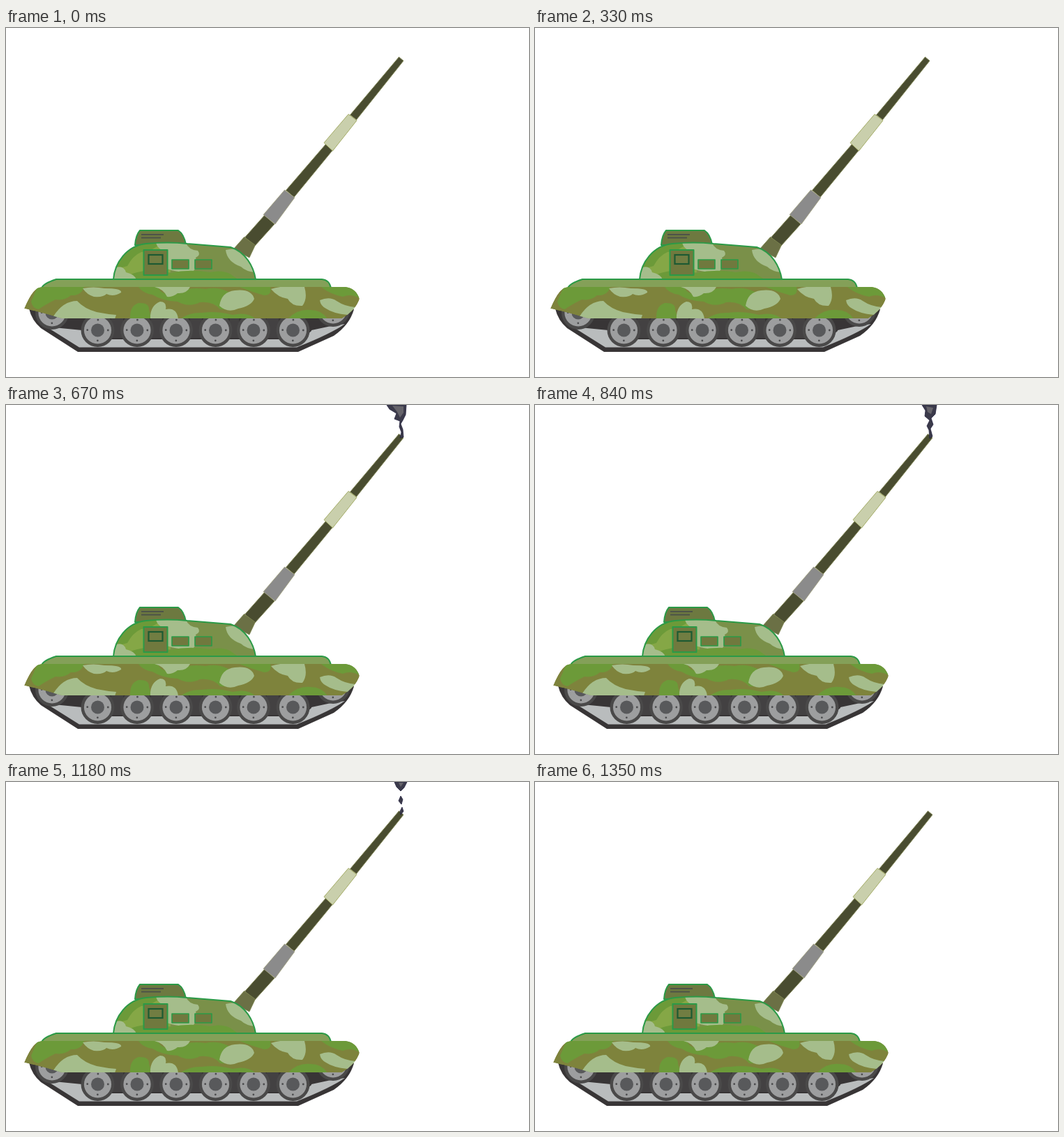
An HTML page for the animation above (1380 ms loop, 750x500 px).

```html
<!DOCTYPE html>
<html lang="en">
<head>
<meta charset="utf-8">
<title>Tank firing</title>
<style>
  html, body { margin: 0; width: 100%; height: 100%; overflow: hidden; background: #fff; }
  svg { display: block; width: 100%; height: 100%; }

  .tank { animation: recoil 1380ms step-end infinite; }
  @keyframes recoil {
    0% { transform: none; }
    23.913% { transform: translateX(-4px); }
    36.232% { transform: none; }
  }

  /* each puff is up for 170 ms; --n is its turn after the shot */
  .puff {
    visibility: hidden;
    animation: puff 1380ms step-end infinite;
    animation-delay: calc(-880ms + var(--n) * 170ms);
  }
  @keyframes puff {
    0% { visibility: visible; }
    12.319%, 100% { visibility: hidden; }
  }

  .light { fill: #a5bd8b; }
  .green { fill: #6c9a39; }
  .lime { fill: #85a746; }
  .olive { fill: #7e833c; }
  .moss { fill: #7a9049; }
  .edge { stroke: #2b9a47; stroke-width: 2; stroke-linejoin: round; }
  .steel { fill: #494c30; stroke: #858a5c; stroke-width: 1; }
  .soot { fill: #3b3a4a; stroke: #24233f; stroke-width: .8; }
  .ash { fill: #66646b; }
</style>
</head>
<body>
<svg viewBox="0 0 750 500">
  <defs>
    <clipPath id="hullClip"><path id="hull" d="M26 402 Q33 385 40 377 Q45 371 53 371 L487 371 Q502 373 507 388 Q502 404 482 416 L80 416 Q45 406 26 402Z"/></clipPath>
    <clipPath id="domeClip"><path id="dome" d="M154 360 C156 336 173 312 201 309 Q232 306 260 309 L322 314 C344 321 355 342 358 360Z"/></clipPath>
    <g id="wheel">
      <circle r="24" fill="#4a4949"/>
      <circle r="19.6" fill="#9d9e9f"/>
      <circle r="9.500" fill="#58595b"/>
      <circle r="14.8" fill="none" stroke="#4b4b4d" stroke-width="2.8" stroke-linecap="round" stroke-dasharray="0 23.248"/>
    </g>
  </defs>

  <g class="tank">
    <!-- barrel -->
    <path class="steel" d="M563.500 41.500 L570 47 L502.500 131.500 L493.500 124.500Z"/>
    <path class="steel" d="M458.500 166.500 L468.500 175 L413 242.500 L401.500 232.500Z"/>
    <path class="steel" d="M371 268 L385 281 L357 312 L342.500 300Z"/>
    <path d="M491 123.500 L503 132.500 L468.500 176 L456 164.500Z" fill="#c9cfac" stroke="#a3ab65"/>
    <path d="M399.500 232 L414 243 L386 281 L369 267.500Z" fill="#8b8b8b" stroke="#a6a67d" stroke-width=".7"/>
    <path d="M341.500 299.500 L357.500 311 L349 329 L326 317Z" fill="#6b7045" stroke="#7e8750" stroke-width=".8"/>

    <!-- cupola -->
    <path class="edge" d="M185 311 Q186 297 192 290 L247 290 Q255 295 258 310Z" fill="#6d7940"/>
    <path d="M194 296 H226 M194 300.500 H222" stroke="#4d5348" stroke-width="1.8"/>

    <!-- turret -->
    <g clip-path="url(#domeClip)">
      <use href="#dome" class="moss"/>
      <path class="lime" d="M154 361 Q160 320 200 307 H236 V350 L186 361Z"/>
      <path class="green" d="M150 347 Q166 310 198 307 L222 308 Q211 320 194 321 Q182 326 174 341Z"/>
      <path class="light" d="M215 307 L258 308 Q262 318 275 319 Q280 325 272 329 Q276 341 269 348 Q250 352 231 345 Q226 335 232 321 Q217 318 215 307Z"/>
      <path class="green" d="M181 352 Q208 343 235 351 Q263 345 292 350 Q309 346 321 352 L334 361 H174Z"/>
      <path class="light" d="M315 318 Q333 313 343 324 L358 350 Q344 349 337 342 Q317 335 315 318Z"/>
      <path class="light" d="M150 361 L158 343 Q169 340 172 350 Q185 353 187 361Z"/>
    </g>
    <use href="#dome" class="edge" fill="none"/>
    <g class="edge" fill="#70793e">
      <rect x="197.500" y="318" width="34" height="36"/>
      <rect x="238" y="332" width="24" height="13" stroke-width="1.6"/>
      <rect x="271" y="332" width="24" height="13" stroke-width="1.6"/>
    </g>
    <rect x="204.500" y="325" width="20" height="13" fill="#717d42" stroke="#1d5a32" stroke-width="2.2"/>

    <!-- tracks -->
    <path d="M33 402 Q37 419 50 430 L103 464 H419 L470 441 Q493 425 499 403Z" fill="#383536"/>
    <path d="M58 428 L109 433 L120 446 H424 L438 433 L466 427 L486 424 Q466 438 417 457.500 H105Z" fill="#b9bcbd"/>
    <path d="M109 412 H438 V434 L424 446 H120 L109 434Z" fill="#383536"/>
    <path d="M151 414 H168 V444 H151Z M208 414 H224 V444 H208Z M264 414 H281 V444 H264Z M321 414 H334 V444 H321Z M374 414 H391 V444 H374Z" fill="#434142"/>
    <use href="#wheel" x="66" y="408"/>
    <use href="#wheel" x="469" y="404"/>
    <use href="#wheel" x="131.500" y="433"/>
    <use href="#wheel" x="188" y="433"/>
    <use href="#wheel" x="244" y="433"/>
    <use href="#wheel" x="300.500" y="433"/>
    <use href="#wheel" x="355" y="433"/>
    <use href="#wheel" x="411.500" y="433"/>
    <path d="M103 461 H419" stroke="#383536" stroke-width="6"/>

    <!-- hull -->
    <path class="edge" d="M51 373 Q53 366 72 360 H453 Q464 361 466 373Z" fill="#84a058"/>
    <g clip-path="url(#hullClip)">
      <use href="#hull" class="olive"/>
      <path class="green" d="M36 392 L45 371 H112 Q108 384 93 383 Q84 391 71 389 Q55 397 47 403 Q38 402 36 392Z"/>
      <path class="light" d="M68 413 Q82 391 102 391 Q112 402 130 407 Q145 410 158 411 L156 417 H78Z"/>
      <path class="green" d="M190 371 H218 Q222 383 241 381 Q260 370 286 374 Q303 370 319 378 L338 388 Q329 405 307 403 Q297 391 278 393 Q262 401 246 392 Q224 391 210 382 Q196 380 190 371Z"/>
      <path class="green" d="M178 417 Q177 398 190 394 Q206 393 205 404 L209 417Z"/>
      <path class="green" d="M250 417 Q263 407 281 408 Q302 405 325 411 Q347 406 358 417Z"/>
      <path class="green" d="M335 371 H379 Q382 383 370 383 Q352 378 335 371Z"/>
      <path class="green" d="M452 371 H492 Q503 376 507 387 Q494 380 483 385 Q464 381 452 371Z"/>
      <path class="green" d="M404 417 Q418 402 437 404 Q453 404 461 417Z"/>
      <path class="light" d="M110 373 Q125 370 141 373 Q167 373 165 379 Q154 386 144 381 Q140 386 126 385 Q116 382 110 373Z"/>
      <path class="light" d="M213 371 H264 Q259 381 246 380 Q239 386 231 385 Q226 374 213 371Z"/>
      <path class="light" d="M207 417 Q206 398 221 392 Q231 392 229 403 Q245 400 247 417Z"/>
      <path class="light" d="M306 398 Q309 378 328 376 Q352 373 356 388 Q352 398 333 402 Q318 409 306 398Z"/>
      <path class="light" d="M380 374 Q398 368 428 371 Q433 388 425 398 Q410 399 404 388 Q390 386 380 374Z"/>
      <path class="light" d="M450 390 Q464 384 474 391 Q486 399 501 400 L490 411 Q469 409 459 402 Q451 398 450 390Z"/>
    </g>
  </g>

  <!-- muzzle flash and smoke -->
  <g class="puff" style="--n:0">
    <path class="soot" d="M545 0 H564 L565 9 L571 15 L570 25 L559 28 L553 22 L557 13 L548 8Z"/>
    <path class="ash" d="M550 1 L560 4 L562 13 L556 9Z"/>
    <path d="M556 18 L565 15 L571 21 L567 28 L570 42 L566 48 L561 43 L562 29 L554 26Z" fill="#a45432"/>
    <path d="M558 23 L566 21 L565 29 L568 40 L565 46 L562 40 L563 28Z" fill="#f1b45b"/>
    <path d="M564 31 L566 40 L564 42Z" fill="#ffe5a0"/>
  </g>
  <g class="puff" style="--n:1">
    <path class="soot" d="M546 0 H574 L573 14 L569 22 L566 27 L569 35 L570 46 L565 47 L567 39 L564 31 L565 23 L557 20 L560 12 L550 6Z"/>
    <path class="ash" d="M554 1 L570 2 L570 11 L565 18 L561 10Z"/>
  </g>
  <g class="puff" style="--n:2">
    <path class="soot" d="M555 0 H576 L574 13 L568 19 L571 28 L567 34 L570 45 L566 48 L565 36 L562 30 L566 22 L559 16 L560 8Z"/>
    <path class="ash" d="M561 2 L571 4 L568 13 L563 10Z"/>
  </g>
  <g class="puff" style="--n:3">
    <path class="soot" d="M558 0 H574 L573 11 L568 17 L564 13 L558 11Z"/>
    <path class="soot" d="M565 19 L569 22 L568 30 L571 36 L567 48 L564 43 L566 35 L562 29Z"/>
    <path class="ash" d="M563 3 L570 3 L568 10Z"/>
  </g>
  <g class="puff" style="--n:4">
    <path class="soot" d="M557 0 H575 L571 8 L566 13 L560 7Z"/>
    <path class="soot" d="M566 20 L569 25 L567 32 L563 27Z M568 36 L570 42 L566 47 L565 42Z"/>
    <path class="ash" d="M563 1 L570 1 L566 7Z"/>
  </g>
</svg>
</body>
</html>
```
